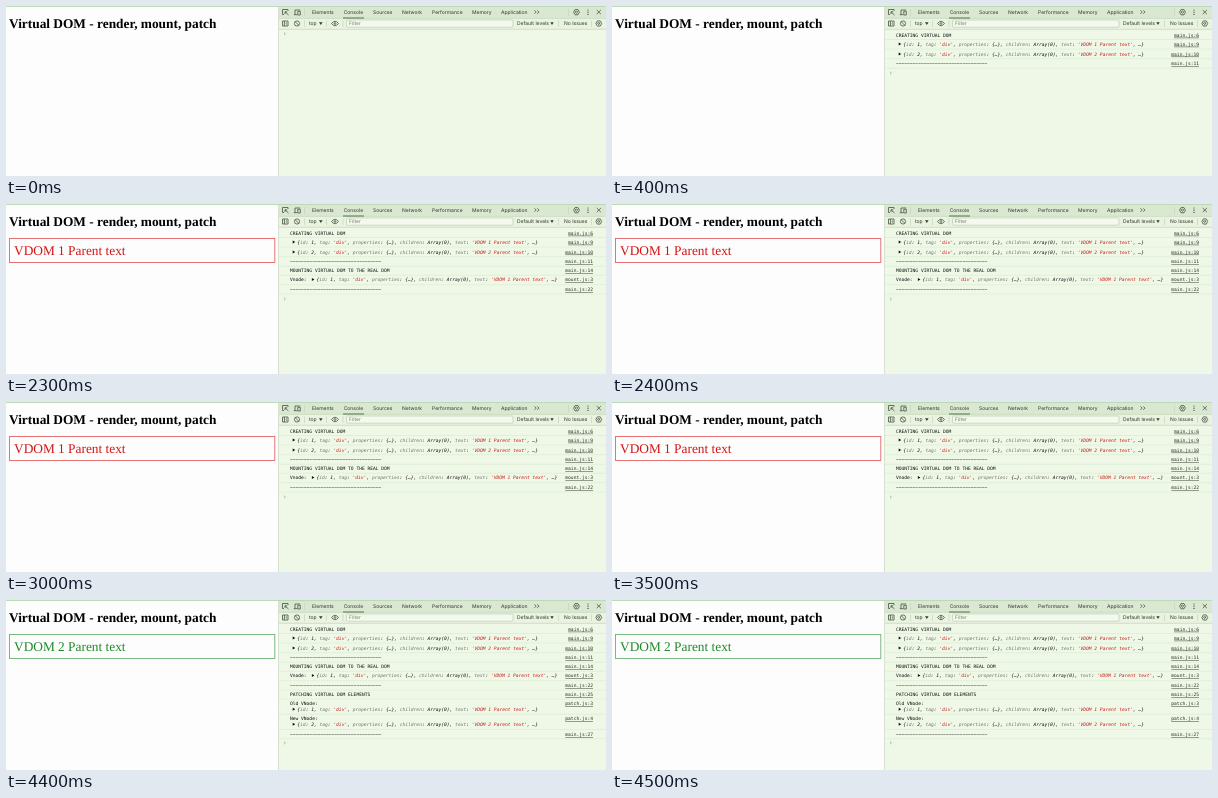
An HTML page for the animation above (5000 ms loop, 600 by 170 pixels).

```html
<!DOCTYPE html>
<html lang="en">
<head>
<meta charset="utf-8">
<title>Virtual DOM</title>
<style>
html, body { margin: 0; width: 100%; height: 100%; overflow: hidden; background: #fdfdfd; }
svg { display: block; }
text { white-space: pre; text-rendering: geometricPrecision; }
.page { font-family: "Liberation Serif", serif; font-size: 13.35px; }
.ui { font: 5px Inter, "Liberation Sans", sans-serif; fill: #30362e; }
.log { font: 4.6px "DejaVu Sans Mono", monospace; fill: #0c0f0b; }
.obj { font-style: italic; }
.key { fill: #6c7468; }
.str { fill: #c41a16; }
.link { text-decoration: underline; fill: #252b23; text-anchor: end; }
.icon { fill: none; stroke: #4a5246; stroke-width: .8; }
.solid { fill: #353c32; }
.rule { stroke: #dcefd3; stroke-width: .8; }
.bar { stroke: #c4d6ba; stroke-width: .7; }
</style>
</head>
<body>
<svg width="600" height="170" viewBox="0 0 600 170">
  <rect width="600" height="170" fill="#fdfdfd"/>
  <rect x="273" width="327" height="170" fill="#eff7e7"/>
  <rect x="273" width="327" height="12.3" fill="#dae7d1"/>
  <rect x="273" y="12.3" width="327" height="11" fill="#e9f3e0"/>
  <path class="bar" d="M273 12.4H600M273 23.3H600M272.5 0V170M298.5 3V10M298.5 14.5V21M320.5 14.5V21M337 14.5V21M552.5 14.5V21M585.5 14.5V21M562.5 3V10"/>
  <rect width="600" height="1" fill="#bddab6"/>
  <rect x="337" y="11.5" width="21" height="1" fill="#52774c"/>
  <rect x="340.5" y="14" width="166.5" height="7.2" rx="1" fill="#f3f9ed" stroke="#bccdb3" stroke-width=".7"/>

  <g class="icon">
    <path d="M278 8.5H276.5V3.5H282V5M279 5.8L282.5 9M279 8V5.8H281.2"/>
    <path d="M289 8.7V4H294.2M287.8 8.7H291.2M291.8 5.3H294.3V9H291.8Z"/>
    <path d="M276.5 15H282V20H276.5ZM278.4 15V20M280.9 16.5L279.8 17.5L280.9 18.5"/>
    <circle cx="291" cy="17.5" r="2.6"/><path d="M289.2 15.7L292.8 19.3"/>
    <path d="M325.5 17.5Q329 13 332.5 17.5Q329 22 325.5 17.5Z"/><circle cx="329" cy="17.5" r=".9"/>
    <path d="M528.5 4.4L530.2 6.1L528.5 7.8M531.3 4.4L533 6.1L531.3 7.8"/>
    <path d="M590.7 4L594.9 8.2M594.9 4L590.7 8.2"/>
    <path id="gear" d="M569 3.6H572L573.4 6.2L572 8.8H569L567.6 6.2ZM570.5 5.2A1 1 0 1 1 570.4 5.2"/>
    <use href="#gear" x="22.3" y="11.3"/>
  </g>
  <g class="solid">
    <circle cx="582" cy="4" r=".6"/><circle cx="582" cy="6.2" r=".6"/><circle cx="582" cy="8.4" r=".6"/>
    <path d="M313 16.3H316.6L314.8 19ZM544.3 16.3H547.7L546 19Z"/>
  </g>

  <g class="ui" id="ui"></g>
  <text class="page" x="3" y="22" font-weight="bold">Virtual DOM - render, mount, patch</text>
  <g id="box">
    <rect x="3.5" y="34.5" width="265.3" height="24" fill="none" stroke="currentColor" stroke-width=".9" stroke-opacity=".65"/>
    <text class="page" id="label" x="8" y="51" fill="currentColor"></text>
  </g>
  <g class="log" id="log"></g>
  <path id="prompt" d="M278 -1.3L279.4 0L278 1.3" fill="none" stroke="#87a98b" stroke-width=".7"/>
</svg>
<script>
const $ = id => document.getElementById(id);
const text = (x, y, s, cls = "") => `<text class="${cls}" x="${x}" y="${y}">${s}</text>`;
const span = (cls, s) => `<tspan class="${cls}">${s}</tspan>`;
const dashes = "−".repeat(33);

$("ui").innerHTML = [
  [306, 8, "Elements"], [337.7, 8, "Console"], [367, 8, "Sources"], [396, 8, "Network"],
  [426, 8, "Performance"], [466, 8, "Memory"], [495, 8, "Application"],
  [303, 19.3, "top"], [511, 19.3, "Default levels"], [558, 19.3, "No Issues"]
].map(a => text(...a)).join("") + `<g fill="#778071">${text(343, 19.3, "Filter")}</g>`;

// A collapsed object preview with its disclosure triangle
function preview(x, y, n) {
  const key = s => span("key", s) + ": ";
  return `<path d="M${x - 4.6} ${y - 3.2}L${x - 2.1} ${y - 1.7}L${x - 4.6} ${y - .2}Z"/>` +
    text(x, y, `{${key("id")}${n}, ${key("tag")}${span("str", "'div'")}, ${key("properties")}{…}, ` +
      `${key("children")}Array(0), ${key("text")}${span("str", `'VDOM ${n} Parent text'`)}, …}`, "obj");
}
const line = (y, s) => text(284, y, s);
const link = (y, s) => text(587, y, s, "link");
const rule = y => `<path class="rule" d="M273 ${y}H600"/>`;

const groups = [
  line(30.7, "CREATING VIRTUAL DOM") + link(30.7, "main.js:6") + rule(33.5) +
  preview(291.3, 39.7, 1) + link(39.7, "main.js:9") + rule(43) +
  preview(291.3, 49.6, 2) + link(49.6, "main.js:10") + rule(52.7) +
  line(59.2, dashes) + link(59.2, "main.js:11") + rule(62.2),

  line(68.2, "MOUNTING VIRTUAL DOM TO THE REAL DOM") + link(68.2, "main.js:14") + rule(71.2) +
  line(77.3, "Vnode:") + preview(310.5, 77.3, 1) + link(77.3, "mount.js:3") + rule(80.7) +
  line(87, dashes) + link(87, "main.js:22") + rule(90),

  line(96, "PATCHING VIRTUAL DOM ELEMENTS") + link(96, "main.js:25") + rule(99) +
  line(105, "Old VNode:") + preview(291.3, 111, 1) + link(105, "patch.js:3") + rule(114.2) +
  line(120, "New VNode:") + preview(291.3, 126, 2) + link(120, "patch.js:4") + rule(129.5) +
  line(136, dashes) + link(136, "main.js:27") + rule(138.7)
];
$("log").innerHTML = groups.map(g => `<g>${g}</g>`).join("");

const starts = [400, 2000, 4400];
const promptY = [27.7, 67, 95, 143];

function draw() {
  const t = performance.now() % 5000;
  const stage = starts.filter(s => t >= s).length;
  [...$("log").children].forEach((g, i) => g.style.display = i < stage ? "" : "none");
  $("prompt").setAttribute("transform", `translate(0 ${promptY[stage]})`);
  $("box").style.display = stage > 1 ? "" : "none";
  $("box").style.color = stage > 2 ? "#1f8a28" : "#d41414";
  $("label").textContent = `VDOM ${stage > 2 ? 2 : 1} Parent text`;
  requestAnimationFrame(draw);
}
draw();
</script>
</body>
</html>
```
